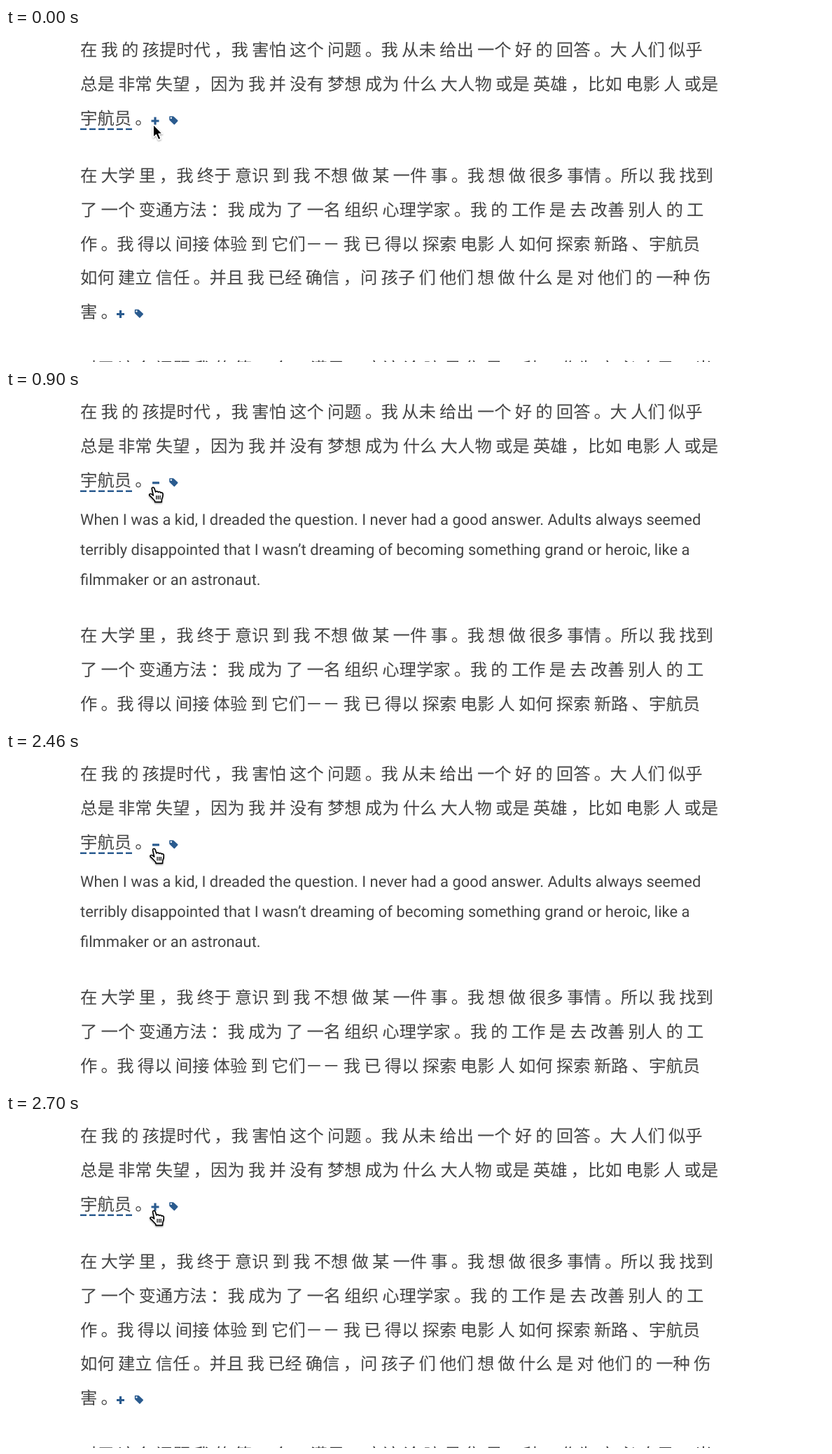
An HTML page for the animation above (2.76 s loop, 1171 by 478 pixels).

```html
<!DOCTYPE html>
<html lang="zh-CN">
<head>
<meta charset="utf-8">
<title>Parallel reading</title>
<style>
  html, body { margin: 0; width: 100%; height: 100%; overflow: hidden; background: #fff; }
  svg { display: block; }
  text { fill: #444; text-rendering: geometricPrecision; }
  .zh { font: 24.4px "Noto Sans CJK SC", "Noto Sans CJK", sans-serif; }
  .en { font: 21.96px Roboto, sans-serif; }
  .icon { fill: #2a5b8f; }
</style>
</head>
<body>
<svg width="1171" height="478" viewBox="0 0 1171 478">
  <defs>
    <clipPath id="fold"><rect id="foldBox" x="100"/></clipPath>
    <filter id="shade" x="-50%" y="-50%" width="200%" height="200%">
      <feDropShadow dx="0" dy="1.2" stdDeviation="1" flood-opacity=".4"/>
    </filter>
    <path id="plus" d="M-1.6-5.5h3.2v3.9h3.9v3.2h-3.9v3.9h-3.2v-3.9h-3.9v-3.2h3.9z"/>
    <path id="tag" fill-rule="evenodd"
      d="M-6-5.2Q-6-6-5.2-6H-1Q-.2-6 .4-5.4L6-.1Q6.6.5 6 1.2L1.8 5.8Q1.2 6.4.5 5.8L-5.4 0Q-6-.6-6-1.2Z
         M-4.6-3.4a1.2 1.2 0 1 0 2.4 0a1.2 1.2 0 1 0-2.4 0z"/>
  </defs>

  <g id="intro">
    <path d="M106 144.7H180" stroke="#2a5b8f" stroke-width="2.6" stroke-dasharray="9 4"/>
    <use id="more" class="icon" href="#plus" x="213" y="133"/>
    <rect id="less" class="icon" x="209" y="131.3" width="10" height="3.2" rx=".5"/>
    <use class="icon" href="#tag" x="239.2" y="132.2"/>
  </g>

  <g clip-path="url(#fold)"><g id="translation"></g></g>

  <g id="rest">
    <use class="icon" href="#plus" x="163.5" y="409.5"/>
    <use class="icon" href="#tag" x="189.8" y="408.8"/>
  </g>

  <g id="arrow" transform="translate(210.3 138)" filter="url(#shade)">
    <path d="M0 0V18.6L4.2 14.7L7.4 22L10.8 20.5L7.7 13.4H13.2Z"
      stroke="#fff" stroke-width="1.4" stroke-linejoin="round"/>
  </g>
  <g id="hand" filter="url(#shade)">
    <path d="M4.4 3.6C3.8 1.2 7 .6 7.8 2.8L9.6 8C10.2 6.8 13 6.8 13.4 8.4C14.2 7.2 16.4 7.6 16.8 9
             C18 8.2 20 9 20 10.8C20.2 14 19.6 16 18.4 18.4L18.2 22.4H8.8L8.4 20.4C6.2 18.4 4.8 16 1 13
             C-.2 11.2 2 9.6 4 11.2L6.4 13Z"
      fill="#fff" stroke="#000" stroke-width="1.6" stroke-linejoin="round"/>
    <path d="M10.8 13V18.4M13.4 13V18.4M16 13V18.4" stroke="#000" stroke-width="1.3"/>
  </g>
</svg>
<script>
const LOOP = 2760, TICK = 60;
const LEFT = 106, EM = 24.4, GAP = 5.1, LEADING = 48.75;
const MARK_SHIFT = 5, STOP_TRIM = 1.6;
const OPEN_AT = 289, CLOSE_AT = 2490, SLIDE = 130, PUSH = 140;
const $ = id => document.getElementById(id);

function addNode(parent, tag, attrs, content = '') {
  const node = document.createElementNS('http://www.w3.org/2000/svg', tag);
  for (const key in attrs) node.setAttribute(key, attrs[key]);
  node.textContent = content;
  return parent.appendChild(node);
}

// Words are set on the full-width grid; punctuation sits nearer the cell middle.
function addChinese(parent, baseline, lines) {
  lines.forEach((line, row) => {
    const text = addNode(parent, 'text', { class: 'zh', y: baseline + row * LEADING });
    let x = LEFT;
    for (const token of line.match(/[，。：、]| |[^，。：、 ]+/g)) {
      if (token === ' ') { x += GAP; continue; }
      const shift = '，。：、'.includes(token) ? MARK_SHIFT : 0;
      addNode(text, 'tspan', { x: (x + shift).toFixed(2) }, token);
      x += token.length * EM - (token === '。' ? STOP_TRIM : 0);
    }
  });
}

addChinese($('intro'), 40.2, [
  '在 我 的 孩提时代， 我 害怕 这个 问题。 我 从未 给出 一个 好 的 回答。 大 人们 似乎',
  '总是 非常 失望， 因为 我 并 没有 梦想 成为 什么 大人物 或是 英雄， 比如 电影 人 或是',
  '宇航员。'
]);
addChinese($('rest'), 220, [
  '在 大学 里， 我 终于 意识 到 我 不想 做 某 一件 事。 我 想 做 很多 事情。 所以 我 找到',
  '了 一个 变通方法： 我 成为 了 一名 组织 心理学家。 我 的 工作 是 去 改善 别人 的 工',
  '作。 我 得以 间接 体验 到 它们－－ 我 已 得以 探索 电影 人 如何 探索 新路、 宇航员',
  '如何 建立 信任。 并且 我 已经 确信， 问 孩子 们 他们 想 做 什么 是 对 他们 的 一种 伤',
  '害。'
]);
addChinese($('rest'), 496.3, [
  '对于 这个 问题 我 的 第 一个， 满足， 应该 论 暗 是 集 是 一种， 作为 方 必 自己， 当'
]);
[
  'When I was a kid, I dreaded the question. I never had a good answer. Adults always seemed',
  'terribly disappointed that I wasn’t dreaming of becoming something grand or heroic, like a',
  'filmmaker or an astronaut.'
].forEach((line, row) =>
  addNode($('translation'), 'text', { class: 'en', x: LEFT, y: 193.3 + row * 43 }, line));

const swing = t => 0.5 - Math.cos(Math.PI * Math.min(1, Math.max(0, t))) / 2;
const show = (id, on) => $(id).setAttribute('visibility', on ? 'visible' : 'hidden');
const move = (id, x, y) => $(id).setAttribute('transform', `translate(${x} ${y})`);

// [from ms, x, y]
const handSteps = [[0, 204, 139], [900, 204, 138], [1920, 205.3, 137]];

function draw(ms) {
  const t = Math.floor((ms % LOOP) / TICK) * TICK;
  const closing = t >= CLOSE_AT;
  const open = closing ? 1 - swing((t - CLOSE_AT) / SLIDE) : swing((t - OPEN_AT) / SLIDE);
  const expanded = t >= OPEN_AT && !closing;

  show('more', !expanded);
  show('less', expanded);
  move('rest', 0, PUSH * open);
  move('translation', 0, -10 * (1 - open));
  $('translation').setAttribute('opacity', open);

  const box = $('foldBox');
  box.setAttribute('y', 154 + 10 * open);
  box.setAttribute('height', 129 * open);
  box.setAttribute('width', closing && open < 0.5 ? 188 : 960);

  const pointing = t >= 120;
  show('arrow', !pointing);
  show('hand', pointing);
  const [, x, y] = handSteps.filter(step => t >= step[0]).pop();
  move('hand', x, y);
}

const start = performance.now();
function tick() {
  draw(performance.now() - start);
  requestAnimationFrame(tick);
}
tick();
</script>
</body>
</html>
```
